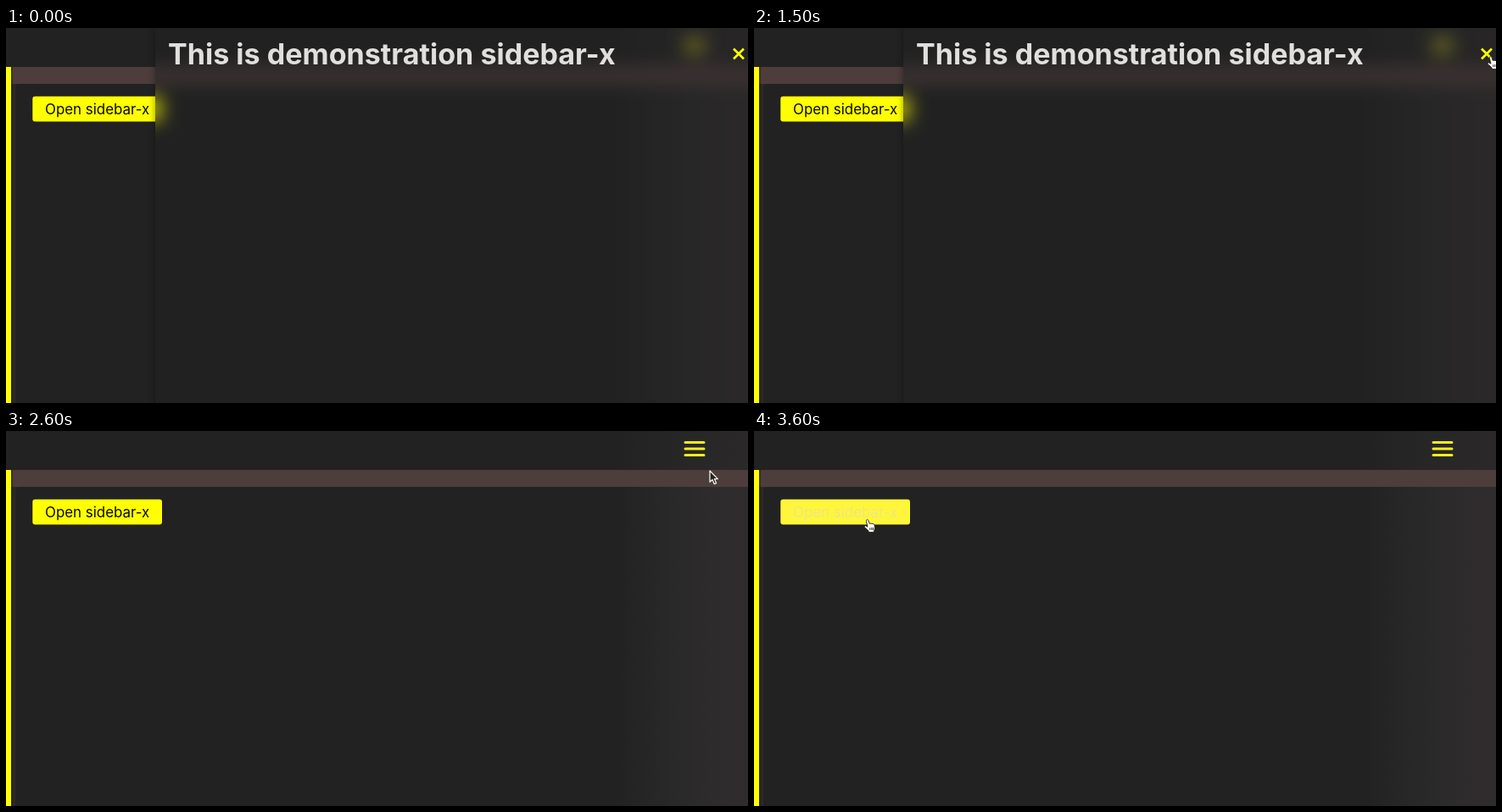
Write an HTML page that moves like this. It is 875 by 443 pixels and loops after 3700 ms.

```html
<!DOCTYPE html>
<html lang="en">
<head>
<meta charset="utf-8">
<title>Sidebar demonstration</title>
<style>
  html, body { margin: 0; width: 100%; height: 100%; overflow: hidden; background: #222; }
  #stage { position: relative; width: 875px; height: 443px; overflow: hidden; background: #222; }
  svg { position: absolute; left: 0; top: 0; display: block; }
  text { font-family: Inter, "Open Sans", sans-serif; }
  #panel {
    position: absolute; left: 176px; top: 0; width: 724px; height: 480px;
    background: rgba(34, 34, 34, .34);
    box-shadow: 0 0 8px rgba(0, 0, 0, .4);
    transform-origin: 349.5px 221.5px;
  }
</style>
</head>
<body>
<div id="stage">
  <svg width="875" height="443">
    <defs>
      <linearGradient id="glow" gradientUnits="userSpaceOnUse" x1="720" x2="875">
        <stop offset="0" stop-color="#383334" stop-opacity="0"/>
        <stop offset=".5" stop-color="#333132" stop-opacity=".5"/>
        <stop offset="1" stop-color="#302c2d"/>
      </linearGradient>
      <linearGradient id="edge">
        <stop offset="0" stop-color="#262323"/>
        <stop offset="1" stop-color="#302c2c"/>
      </linearGradient>
      <filter id="blur" filterUnits="userSpaceOnUse" x="-60" y="-60" width="1000" height="570" color-interpolation-filters="sRGB">
        <feGaussianBlur stdDeviation="10"/>
      </filter>
      <clipPath id="panelClip"><polygon id="panelShape"/></clipPath>
    </defs>
    <!-- Drawn past the stage so that the blur has no pale rim -->
    <g id="page">
      <rect x="-60" y="-60" width="1000" height="570" fill="#222"/>
      <rect x="720" y="-60" width="220" height="106" fill="url(#glow)" opacity=".6"/>
      <rect y="46" width="940" height="20.5" fill="#4d3d3c"/>
      <rect x="6" y="66" width="6" height="444" fill="url(#edge)"/>
      <path d="M11 510V70Q11 66 15 66H940V510Z" fill="#222"/>
      <rect x="720" y="66" width="220" height="444" fill="url(#glow)"/>
      <rect y="46" width="6" height="464" fill="#ff0"/>
      <rect x="6" y="46" width="2" height="464" fill="#222" opacity=".55"/>
      <path d="M801 13.5H823M801 21H823M801 28.5H823" stroke="#f6f01c" stroke-width="3" stroke-linecap="round"/>
      <rect id="button" x="31.3" y="80.8" width="152.7" height="29.8" rx="3"/>
      <text id="label" x="46" y="101.6" font-size="16.9" font-weight="400">Open sidebar-x</text>
    </g>
    <g id="frost" clip-path="url(#panelClip)"><use href="#page" filter="url(#blur)"/></g>
  </svg>
  <div id="panel">
    <svg width="724" height="480">
      <text x="15" y="43" font-size="34.1" font-weight="700" fill="#e0dfde">This is demonstration sidebar-x</text>
      <path d="M682 24.5l12 12m0-12l-12 12" stroke="#ff0" stroke-width="2.7" fill="none"/>
    </svg>
  </div>
  <svg width="875" height="443">
    <path id="arrow" d="M0 0V13.2L3 10.4L5.2 15.6L7.6 14.6L5.4 9.6H9.4Z" fill="#222" stroke="#f2f0e6" stroke-width="1.3" stroke-linejoin="round"/>
    <g id="hand" stroke="#222" stroke-width=".9" stroke-linejoin="round">
      <path d="M2.6 1.2Q3.8-.2 4.8 1.4L6.2 5.4Q7.2 4.6 8 5.6Q9.2 4.8 10 5.8Q11.4 5.2 12 6.8L12.6 10.4Q12.6 12.4 11.6 13.6V15.6H5.4L4.8 13.6L.4 9.8Q-.4 8.2 1.2 7.8L4 9.2L2.4 2.6Z" fill="#fffff0"/>
      <path d="M6.8 10.2V13M8.8 10V13M10.6 10V13" fill="none"/>
    </g>
  </svg>
</div>
<script>
const LOOP = 3700, STEP = 100;
const $ = id => document.getElementById(id);
const panel = $("panel"), frost = $("frost"), panelShape = $("panelShape");
const button = $("button"), label = $("label");
const arrow = $("arrow"), hand = $("hand");

// Pointer stops: time, x, y
const route = [
  [700, 846, 392], [1000, 777, 178], [1200, 774, 162],
  [1500, 865, 33], [2000, 863, 33], [2500, 863, 33],
  [2600, 830, 47], [2800, 520, 72], [3100, 130, 104], [LOOP, 130, 104]
];

const lerp = (a, b, p) => a + (b - a) * p;
const clamp = v => Math.min(1, Math.max(0, v));
const mix = (a, b, p) => `rgb(${a.map((v, i) => Math.round(lerp(v, b[i], p)))})`;

function pointerAt(t) {
  const i = route.findIndex(stop => stop[0] > t);
  const [t0, x0, y0] = route[i - 1], [t1, x1, y1] = route[i];
  const p = (t - t0) / (t1 - t0);
  return [lerp(x0, x1, p), lerp(y0, y1, p)];
}

function drawPointer(t) {
  const overClose = t >= 1500 && t < 2600, overButton = t >= 3100;
  const isHand = overClose || overButton;
  const visible = t >= 700;
  arrow.style.display = visible && !isHand ? "" : "none";
  hand.style.display = visible && isHand ? "" : "none";
  if (visible) (isHand ? hand : arrow).setAttribute("transform", `translate(${pointerAt(t)})`);
}

// Swings the panel's right side away from the viewer
function drawPanel(t) {
  panel.style.display = frost.style.display = t < 2200 ? "" : "none";
  const p = t < 2000 ? 0 : t < 2100 ? .2 : 1;
  const depth = .00024 * p, squeeze = 1 - .088 * p, shift = 6.5 * p;
  const project = ([x, y]) => {
    const u = x - 525.5, v = y - 221.5, w = 1 + depth * u;
    return [525.5 + shift + squeeze * u / w, 221.5 + v / w];
  };
  const corners = [[176, 0], [900, 0], [900, 480], [176, 480]];
  panelShape.setAttribute("points", corners.map(project).join(" "));
  panel.style.opacity = frost.style.opacity = 1 - .2 * p;
  panel.style.transform = p
    ? `matrix3d(${squeeze + shift * depth},0,0,${depth},0,1,0,0,0,0,1,0,${shift},0,0,1)`
    : "none";
}

function drawButton(t) {
  const p = clamp((t - 3100) / 500);
  button.setAttribute("fill", mix([255, 255, 0], [255, 246, 60], p));
  label.setAttribute("fill", mix([10, 10, 0], [236, 230, 130], p));
}

let shown = -1;
function render(time) {
  const t = Math.floor(time % LOOP / STEP) * STEP;
  if (t === shown) return;
  shown = t;
  drawPanel(t);
  drawButton(t);
  drawPointer(t);
}

const start = performance.now();
function tick() {
  render(performance.now() - start);
  requestAnimationFrame(tick);
}
tick();
</script>
</body>
</html>
```
